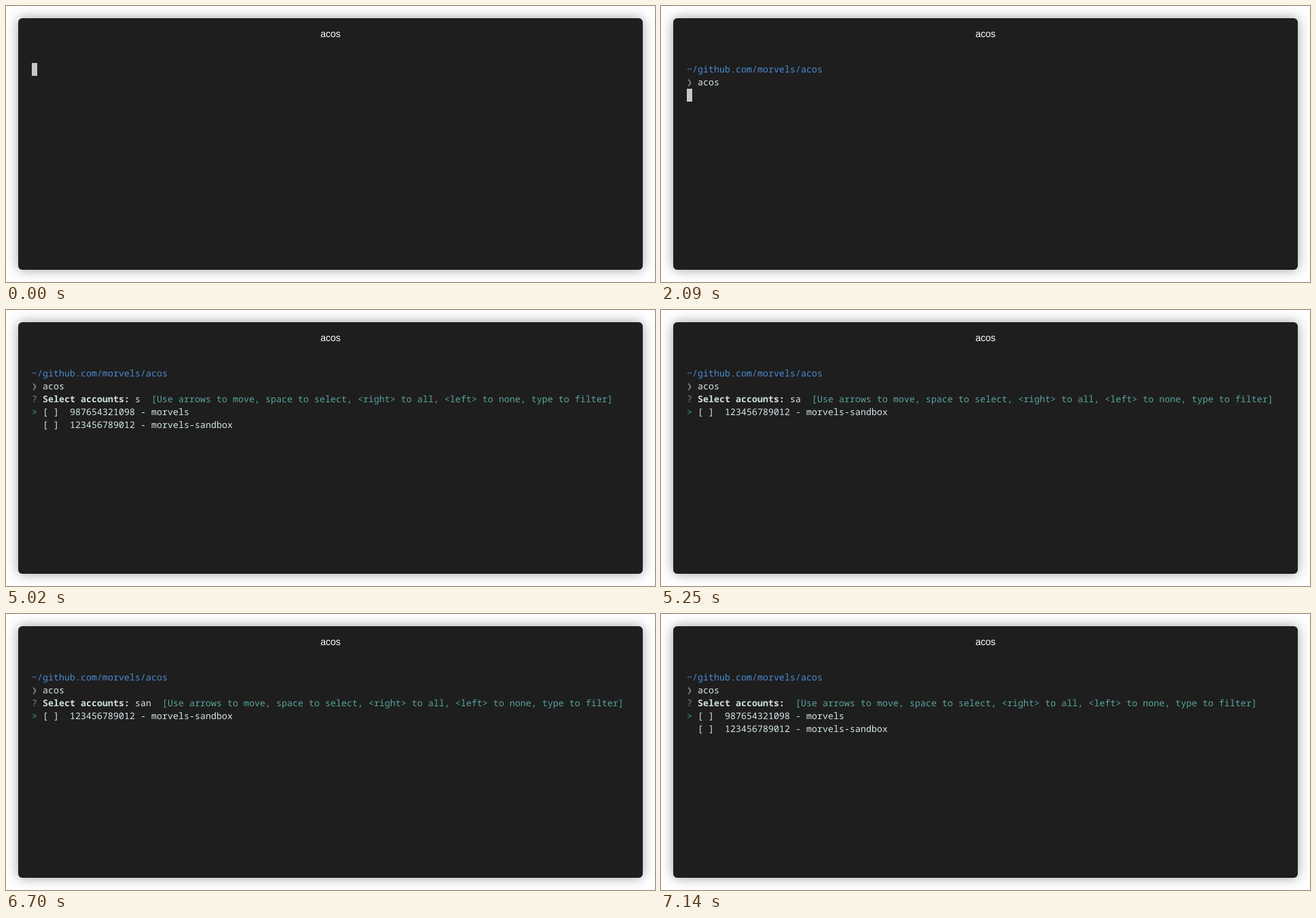
Animation of 956x407 px, one loop 8 s. Source, as an HTML page:

```html
<!DOCTYPE html>
<html lang="en">
<head>
<meta charset="utf-8">
<title>acos</title>
<style>
  html, body { margin: 0; width: 100%; height: 100%; overflow: hidden; background: #fff; }
  svg { position: absolute; left: 0; top: 0; width: 956px; height: 407px; }
  .window {
    position: absolute; left: 18px; top: 18px; width: 920px; height: 371px;
    border-radius: 6px; background: #1e1e1e; box-shadow: 0 0 18px rgba(0, 0, 0, .38);
  }
  .title { font: 14px "Liberation Sans", Arial, sans-serif; fill: #fff; text-anchor: middle; }
  #screen text {
    font: 13.3333px "Noto Sans Mono", "DejaVu Sans Mono", monospace;
    white-space: pre; text-rendering: geometricPrecision;
  }
  #screen .path { fill: #4b8bd2; }
  #screen .ready { fill: #7b5c80; }
  #screen .done { fill: #878280; }
  #screen .draft { fill: #d3d9e6; font-style: italic; }
  #screen .plain { fill: #d5e5e7; font-weight: 500; }
  #screen .bold { fill: #d3e0e0; font-weight: 700; }
  #screen .hint { fill: #58a49d; }
  #screen .mark { fill: #4f9f99; font-weight: 500; }
</style>
</head>
<body>
<div class="window"></div>
<svg viewBox="0 0 956 407">
  <text class="title" x="478" y="46">acos</text>
  <g id="screen"></g>
</svg>
<script>
const LOOP = 8000, LEFT = 38, TOP = 84, CELL = 8, ROW = 19;
const COMMAND = "acos";
const ACCOUNTS = ["987654321098 - morvels", "123456789012 - morvels-sandbox"];
const HINT = "[Use arrows to move, space to select, <right> to all, <left> to none, type to filter]";

// Each pair is a start time and the value from then on.
const TYPED = [[540, 0], [1460, 1], [1600, 2], [1790, 3], [1900, 4]];
const FILTER = [
  [3020, ""], [5020, "s"], [5250, "sa"], [5430, "san"], [5590, "sand"],
  [6700, "san"], [6850, "sa"], [7000, "s"], [7140, ""]
];
const ENTER = 2090, MENU = 3020;

const screen = document.getElementById("screen");
let last = "";

function at(steps, t) {
  let value = steps[0][1];
  for (const [start, v] of steps) if (t >= start) value = v;
  return value;
}

const escapeText = s => s.replace(/&/g, "&amp;").replace(/</g, "&lt;").replace(/>/g, "&gt;");

function put(col, row, kind, str) {
  const x = LEFT + col * CELL, y = TOP + 14 + row * ROW;
  return `<text class="${kind}" x="${x}" y="${y}">${escapeText(str)}</text>`;
}

function cursor(col, row) {
  const x = LEFT + col * CELL, y = TOP + row * ROW;
  return `<rect x="${x}" y="${y}" width="${CELL}" height="${ROW}" fill="#c7c7c7"/>`;
}

function menu(filter) {
  const label = "Select accounts:";
  const hintCol = 2 + label.length + (filter ? filter.length + 3 : 2);
  let out = put(0, 2, "done", "?") + put(2, 2, "bold", label) +
    put(3 + label.length, 2, "plain", filter) + put(hintCol, 2, "hint", HINT) +
    put(0, 3, "mark", ">");
  ACCOUNTS.filter(a => a.includes(filter)).forEach((a, i) => {
    out += put(2, 3 + i, "plain", "[ ]") + put(7, 3 + i, "plain", a);
  });
  return out;
}

function render(t) {
  if (t < TYPED[0][0]) return cursor(0, 0);
  const count = at(TYPED, t), entered = t >= ENTER;
  let out = put(0, 0, "path", "~/github.com/morvels/acos") +
    put(0, 1, entered ? "done" : "ready", "❯") +
    put(2, 1, count < COMMAND.length ? "draft" : "plain", COMMAND.slice(0, count));
  if (t >= MENU) out += menu(at(FILTER, t));
  else out += entered ? cursor(0, 2) : cursor(2 + count, 1);
  return out;
}

function frame(now) {
  const html = render(now % LOOP);
  if (html !== last) screen.innerHTML = last = html;
  requestAnimationFrame(frame);
}
frame(0);
</script>
</body>
</html>
```
